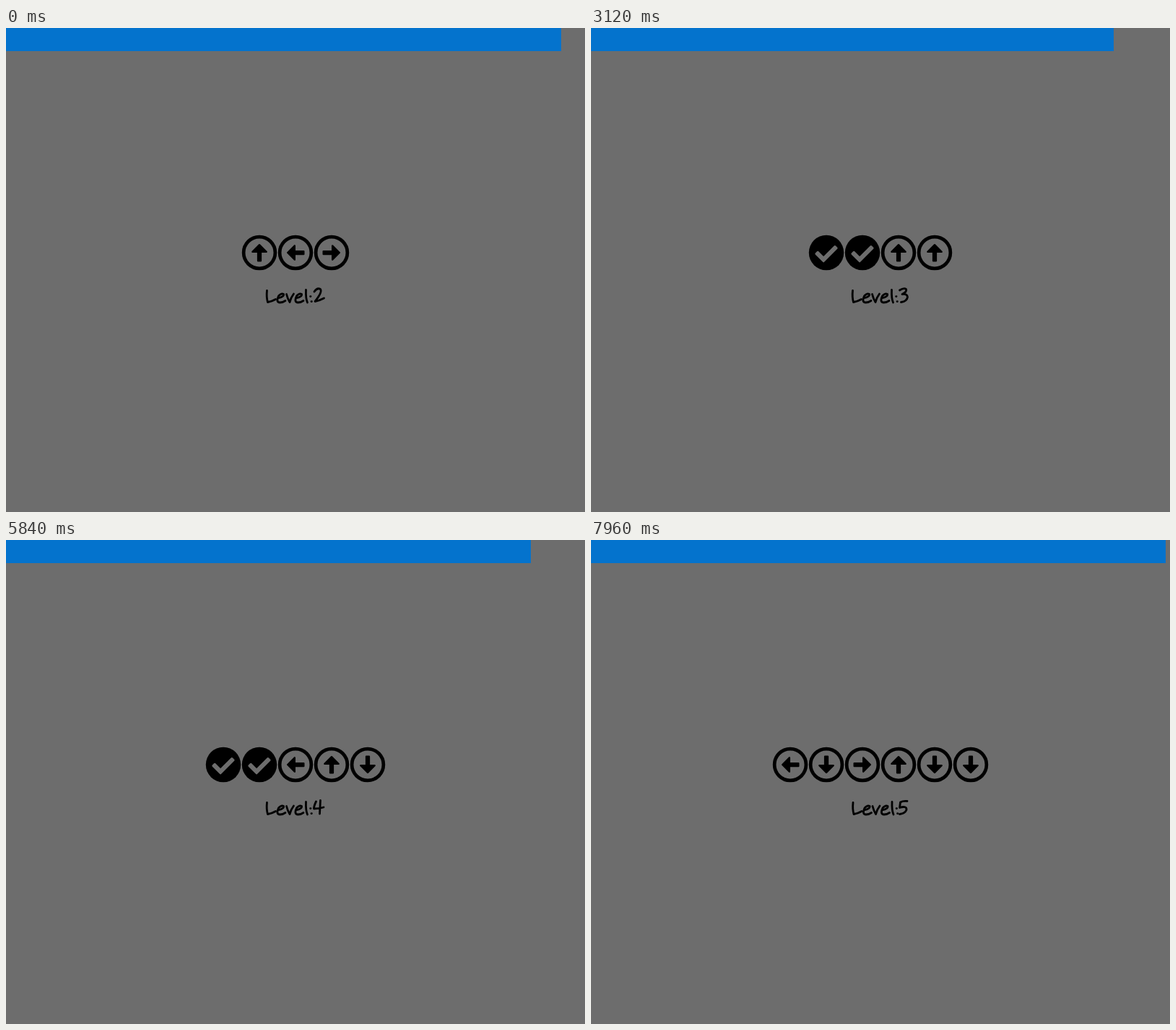
Write an HTML page that moves like this. It is 802 by 670 pixels and loops after 8000 ms.

```html
<!DOCTYPE html>
<html lang="en">
<head>
<meta charset="utf-8">
<title>Arrow levels</title>
<style>
  html, body { margin: 0; width: 100%; height: 100%; overflow: hidden; background: #6d6d6d; }
  svg { display: block; width: 802px; height: 670px; }
  .ring { fill: none; stroke: #000; stroke-width: 48; }
  .head { stroke: #000; stroke-width: 24; stroke-linejoin: round; }
  .tick { fill: #6d6d6d; stroke: #6d6d6d; stroke-width: 32; stroke-linejoin: round; }
  .pen { fill: none; stroke: #000; stroke-width: 2.8; stroke-linecap: round; stroke-linejoin: round; }
</style>
</head>
<body>
<svg viewBox="0 0 802 670">
  <defs>
    <g id="arrow">
      <circle class="ring" cx="256" cy="256" r="224"/>
      <path class="head" d="M236 372V244H157L256 145 355 244H276V372z"/>
    </g>
    <g id="done">
      <circle cx="256" cy="256" r="248"/>
      <path class="tick" d="M400 192 377.4 169.4 216 330.7 134.6 249.4 112 272 216 376z"/>
    </g>
    <path id="e" d="M376.5 374q9-2 8-5.5q-3-2-7 2.5q-4 9 2 9q4 0 7.5-2.5"/>
    <g id="word">
      <path d="M361.5 363.5q-1 9 1 16q6-1 11-4"/>
      <use href="#e"/>
      <path d="M388.5 368.5q1.5 6 4.5 11q2-7 5.5-11.5"/>
      <use href="#e" x="25"/>
      <path d="M415.5 362.5q-.5 12 2 17.5M421.6 371.6h.4M423 378.6h.4"/>
    </g>
  </defs>
  <rect id="bar" height="32" fill="#0473cd"/>
  <g id="levels"></g>
</svg>
<script>
const LOOP = 8000;
const FULL = 802;     // full bar width
const RATE = 0.04;    // drain in px per ms
const REFILL = 600;   // length of the eased refill in ms
const TURN = { U: 0, R: 90, D: 180, L: 270 };

// start: level opens; lag: pause before the bar drains; first: first arrow is ticked
const levels = [
  { no: 2, arrows: 'ULR', start: -1000, lag: 175, first: 300, shift: 0,
    digit: 'M427 365q4-6 8.5-3.5q3 4-7.5 17q6-1 12.5-4.5' },
  { no: 3, arrows: 'RLUU', start: 1100, lag: 150, first: 2800, shift: 1,
    digit: 'M427.5 363q6-4 9-1.5q1.5 3.5-5.5 7q7-1 7.5 4q-1 6-9 7' },
  { no: 4, arrows: 'RDLUD', start: 3900, lag: 225, first: 5400, shift: 0,
    digit: 'M429.5 362q-3 6-3 10q7 0 13.5-2M435.5 360.5q-.5 10-1 18.5' },
  { no: 5, arrows: 'LDRUDD', start: 7700, lag: 400, first: Infinity, shift: 1.5,
    digit: 'M438 361.5q-6-.5-9.5 1.5l-1 7.5q10-3 9.5 3q-2 5-9.5 6' }
];

const SVG = 'http://www.w3.org/2000/svg';
function add(parent, tag, attrs = {}) {
  const el = document.createElementNS(SVG, tag);
  for (const k in attrs) el.setAttribute(k, attrs[k]);
  return parent.appendChild(el);
}

// Same curve as the CSS keyword "ease"
function ease(x) {
  if (x >= 1) return 1;
  let lo = 0, hi = 1;
  for (let i = 0; i < 20; i++) {
    const u = (lo + hi) / 2;
    if (0.75 * u * (1 - u) + u ** 3 < x) lo = u; else hi = u;
  }
  return 0.3 * lo * (1 - lo) ** 2 + 3 * lo * lo * (1 - lo) + lo ** 3;
}

function barWidth(lv, t) {
  const age = t - lv.start;
  return FULL - RATE * Math.max(0, age - lv.lag) - lv.gap * (1 - ease(age / REFILL));
}

const bar = document.getElementById('bar');
const root = document.getElementById('levels');

levels.forEach((lv, n) => {
  const prev = levels[n - 1], next = levels[n + 1];
  lv.gap = prev ? FULL - barWidth(prev, lv.start) : 0;
  // Keys come at an even pace; the last one opens the next level
  lv.pace = next ? (next.start - lv.first) / (lv.arrows.length - 1) : 0;

  lv.el = add(root, 'g');
  const left = 401 - lv.arrows.length * 25;
  lv.icons = [...lv.arrows].map((dir, i) => {
    const box = add(lv.el, 'g', { transform: `translate(${left + i * 50} 286) scale(${50 / 512})` });
    return {
      arrow: add(box, 'use', { href: '#arrow', transform: `rotate(${TURN[dir]} 256 256)` }),
      done: add(box, 'use', { href: '#done' })
    };
  });
  const label = add(lv.el, 'g', { class: 'pen', role: 'img', 'aria-label': 'Level:' + lv.no });
  add(label, 'use', { href: '#word', x: lv.shift });
  add(label, 'path', { d: lv.digit });
});

// Game time moves in 100 ms steps; every 29th step is shown for only 20 ms
function gameTime(t) {
  const u = t + 1020, v = u % 2820;
  const steps = Math.floor(u / 2820) * 29 + (v < 20 ? 0 : 1 + Math.floor((v - 20) / 100));
  return (steps - 11) * 100;
}

const show = (el, on) => el.setAttribute('display', on ? 'inline' : 'none');

function draw(t) {
  const now = levels.filter(lv => lv.start <= t).pop();
  bar.setAttribute('width', Math.round(barWidth(now, t)));
  for (const lv of levels) show(lv.el, lv === now);
  now.icons.forEach((icon, i) => {
    const ticked = t >= now.first + i * now.pace;
    show(icon.arrow, !ticked);
    show(icon.done, ticked);
  });
}

const begin = performance.now();
function tick() {
  draw(gameTime((performance.now() - begin) % LOOP));
  requestAnimationFrame(tick);
}
tick();
</script>
</body>
</html>
```
